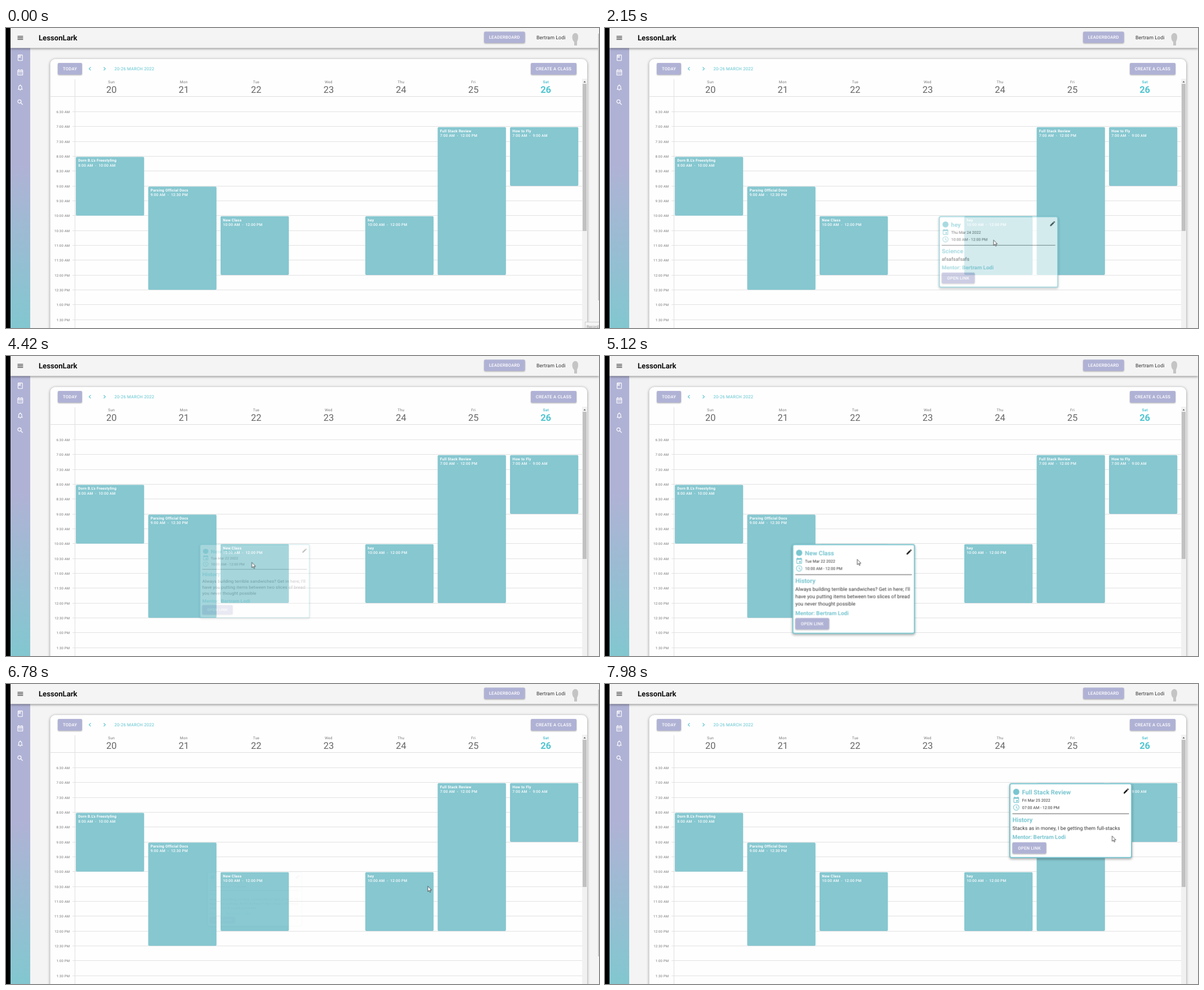
An HTML page that plays this animation: 1053x532 px, repeating every 8000 ms.

```html
<!DOCTYPE html>
<html lang="en">
<head>
<meta charset="utf-8">
<title>Class calendar</title>
<style>
html, body { margin: 0; width: 100%; height: 100%; overflow: hidden; background: #f4f4f4; }
svg { display: block; font-family: Roboto, sans-serif; text-rendering: geometricPrecision; }
.teal { fill: #78c6d0; }
.bold { font-weight: 700; }
.btn rect { fill: #b0b2d5; filter: drop-shadow(0 1px 1px rgba(0,0,0,.3)); }
.btn text { fill: #fff; font-size: 7.67px; font-weight: 500; letter-spacing: .02857em; text-anchor: middle; }
.day { font-size: 6.58px; letter-spacing: .0333em; text-anchor: middle; fill: #777; }
.date { font-size: 16.45px; text-anchor: middle; fill: #666; }
.now { fill: #50c5d1; font-weight: 700; }
.hour { font-size: 6.03px; letter-spacing: .0333em; text-anchor: end; fill: #757575; }
.event rect { fill: #86c7d0; }
.event text { fill: #fff; font-size: 6.58px; font-weight: 500; letter-spacing: .0333em; }
.event .bold { font-weight: 700; }
.frame { fill: #fff; stroke: #7cc6d0; stroke-width: 2; filter: drop-shadow(0 2px 2px rgba(0,0,0,.35)); }
.title { font-size: 10.97px; font-weight: 700; }
.when { font-size: 7.13px; fill: #333; }
.body { font-size: 8.77px; letter-spacing: .00938em; fill: #333; }
.mentor { font-size: 9.87px; font-weight: 700; }

.pop, .grow { animation: 8s cubic-bezier(.4,0,.2,1) infinite; }
.p1 { animation-name: fade1; } .p1 .grow { animation-name: grow1; }
.p2 { animation-name: fade2; } .p2 .grow { animation-name: grow2; }
.p3 { animation-name: fade3; } .p3 .grow { animation-name: grow3; }
@keyframes fade1 { 0%, 25.35%, 48.69%, 100% { opacity: 0 } 29.04%, 45% { opacity: 1 } }
@keyframes grow1 { 0%, 25.35%, 48.69%, 100% { transform: scale(.75,.5625) } 27.8%, 46.23% { transform: scale(1,1) } }
@keyframes fade2 { 0%, 54.25%, 85.68%, 100% { opacity: 0 } 58.11%, 81.81% { opacity: 1 } }
@keyframes grow2 { 0%, 54.25%, 85.68%, 100% { transform: scale(.75,.5625) } 56.83%, 83.1% { transform: scale(1,1) } }
@keyframes fade3 { 0%, 91.06% { opacity: 0 } 94.75%, 100% { opacity: 1 } }
@keyframes grow3 { 0%, 91.06% { transform: scale(.75,.5625) } 93.51%, 100% { transform: scale(1,1) } }

.thumb { animation: lock 8s step-end infinite; }
@keyframes lock {
  0%, 45%, 81.81% { opacity: 1 }
  25.35%, 54.25%, 91.06%, 100% { opacity: 0 }
}
.tip { animation: tip 8s step-end infinite; }
@keyframes tip { 0% { opacity: 1 } .75%, 100% { opacity: 0 } }
.click { animation: click 8s step-end infinite; }
@keyframes click {
  0%, 22.75%, 44.5%, 51.5%, 81.6%, 88.6%, 100% { opacity: 0 }
  21.5%, 43.4%, 50.4%, 80.5%, 87.5% { opacity: .9 }
}
.cursor { animation: move 8s ease-in-out infinite; }
@keyframes move {
  0%, .37% { transform: translate(1040px,534px) }
  5.13%, 16% { transform: translate(445px,248px) }
  19.38%, 29.2% { transform: translate(690px,375.5px) }
  35% { transform: translate(640px,358px) }
  39.4% { transform: translate(529px,296px) }
  42%, 45.6% { transform: translate(536.5px,293.5px) }
  50%, 58.5% { transform: translate(436.5px,365.5px) }
  64.5% { transform: translate(448px,360px) }
  66.5% { transform: translate(358px,386px) }
  70% { transform: translate(446px,410px) }
  72.5% { transform: translate(360px,424px) }
  74.4% { transform: translate(400px,437px) }
  79.4%, 82.3% { transform: translate(662px,468.5px) }
  87.2%, 93.5% { transform: translate(834.5px,249.5px) }
  98.75%, 100% { transform: translate(900.5px,269px) }
}
</style>
</head>
<body>
<svg id="stage" width="1053" height="532" viewBox="0 0 1053 532"></svg>
<script>
const MENTOR = 'Bertram Lodi';
const COL = 128.57, ROW = 26.33, FIRST = 148.4;
const range = n => [...Array(n).keys()];

const icons = {
  menu: '<path d="M3 6h18v2H3zM3 11h18v2H3zM3 16h18v2H3z"/>',
  left: '<path d="M15.4 7.4L14 6l-6 6 6 6 1.4-1.4L10.8 12z"/>',
  right: '<path d="M10 6L8.6 7.4l4.6 4.6-4.6 4.6L10 18l6-6z"/>',
  book: '<path fill-rule="evenodd" d="M6 2h12a2 2 0 0 1 2 2v16a2 2 0 0 1-2 2H6a2 2 0 0 1-2-2V4a2 2 0 0 1 2-2zM9 4h2v5l-1-.75L9 9zM18 20H6V4h1v9l3-2.25L13 13V4h5z"/>',
  month: '<path fill-rule="evenodd" d="M6 1h2v2h8V1h2v2h1a2 2 0 0 1 2 2v14a2 2 0 0 1-2 2H5a2 2 0 0 1-2-2V5a2 2 0 0 1 2-2h1zM5 9v10h14V9zM5 5v2h14V5z"/><path d="M7 11h2v2H7zM11 11h2v2h-2zM15 11h2v2h-2zM7 15h2v2H7zM11 15h2v2h-2zM15 15h2v2h-2z"/>',
  bell: '<path fill-rule="evenodd" d="M10 20h4a2 2 0 0 1-4 0zM18 16v-5c0-3.1-1.6-5.6-4.5-6.3V4a1.5 1.5 0 0 0-3 0v.7C7.6 5.4 6 7.9 6 11v5l-2 2v1h16v-1zM16 17H8v-6c0-2.5 1.5-4.5 4-4.5s4 2 4 4.5z"/>',
  search: '<path d="M14.2 14.2l5.6 5.6M15 9.5a5.5 5.5 0 1 1-11 0a5.5 5.5 0 0 1 11 0z" fill="none" stroke="#fff" stroke-width="2.1"/>',
  event: '<path fill-rule="evenodd" d="M6 1h2v2h8V1h2v2h1a2 2 0 0 1 2 2v14a2 2 0 0 1-2 2H5a2 2 0 0 1-2-2V5a2 2 0 0 1 2-2h1zM5 8v11h14V8z"/><path d="M12 12h5v5h-5z"/>',
  clock: '<path d="M12 7v5.5l4.5 2.7M21 12a9 9 0 1 1-18 0a9 9 0 0 1 18 0z" fill="none" stroke="#78c6d0" stroke-width="1.9"/>',
  edit: '<path d="M3 17.25V21h3.75L17.8 9.95 14.05 6.2zM20.7 7a1 1 0 0 0 0-1.4l-2.3-2.3a1 1 0 0 0-1.4 0l-1.9 1.8 3.75 3.75z"/>'
};

const icon = (name, x, y, fill, size = 13.16) =>
  `<g transform="translate(${x - size / 2} ${y - size / 2}) scale(${size / 24})" fill="${fill}">${icons[name]}</g>`;
const text = (x, y, cls, s, attr = '') => `<text x="${x}" y="${y}" class="${cls}" ${attr}>${s}</text>`;
const rect = (x, y, w, h, attr) => `<rect x="${x}" y="${y}" width="${w}" height="${h}" ${attr}/>`;
const button = (x, y, w, h, label) =>
  `<g class="btn">${rect(x, y, w, h, 'rx="2"')}${text(x + w / 2, y + h / 2 + 2.6, '', label)}</g>`;

function shell() {
  return rect(0, 0, 1053, 532, 'fill="#f4f4f4"') +
    rect(8, 30, 35, 502, 'fill="url(#side)"') +
    ['book', 'month', 'bell', 'search'].map((n, i) => icon(n, 25.3, 52.8 + i * 26.3, '#fff')).join('') +
    rect(8, 0, 1045, 35.5, 'fill="#f4f4f4" style="filter:drop-shadow(0 1px 2px rgba(0,0,0,.5))"') +
    rect(0, 0, 8, 532, 'fill="#000"') +
    icon('menu', 25.4, 17.5, '#111') +
    text(58, 22, 'bold', 'LessonLark', 'font-size="13.16" fill="#111"') +
    button(849, 6.5, 72.5, 20, 'LEADERBOARD') +
    text(942, 20.4, 'body', MENTOR) +
    '<path d="M1011 9c4 0 5.300 4 5 8s-1.600 6-2 7v7h-5v-6c-2-2-3.500-5-3.500-8.500s1.500-7.500 5.500-7.500z" fill="#c4c4c4"/>';
}

function calendar() {
  const days = ['Sun', 'Mon', 'Tue', 'Wed', 'Thu', 'Fri', 'Sat'];
  const head = days.map((d, i) => {
    const x = 187.2 + i * COL, now = i == 6 ? ' now' : '';
    return text(x, 98.4, 'day' + now, d) + text(x, 115, 'date' + now, 20 + i);
  }).join('');
  const rows = range(15).map(i => {
    const y = Math.floor(FIRST + i * ROW) + .5, m = 390 + i * 30, h = Math.floor(m / 60);
    const label = `${(h + 11) % 12 + 1}:${m % 60 ? '30' : '00'} ${h < 12 ? 'AM' : 'PM'}`;
    return `<path d="M118 ${y}H1023" stroke="#e2e2e2"/>` + text(113.3, y + 2, 'hour', label);
  }).join('');
  return rect(78.5, 55, 953.5, 500, 'rx="9" fill="#fefefe" style="filter:drop-shadow(0 1px 2.5px rgba(0,0,0,.42))"') +
    button(92, 62, 43, 20.8, 'TODAY') +
    icon('left', 149, 72.3, '#50c0cc') + icon('right', 175, 72.3, '#50c0cc') +
    text(192.5, 75, '', '20-26 MARCH 2022', 'font-size="7.67" letter-spacing=".22" fill="#5bc3cf"') +
    button(932, 62, 81, 20.8, 'CREATE A CLASS') +
    head + rows +
    '<path d="M79 121.500H1023M122.500 91V532" stroke="#dfdfdf" fill="none"/>' +
    rect(1023, 90, 9, 442, 'fill="#f1f1f1"') + rect(1024, 99, 7, 261, 'fill="#c1c1c1"') +
    '<path d="M1025.500 96.500h4l-2-2.500z" fill="#555"/>';
}

function event(day, from, to, title, span) {
  const x = 124 + day * 128.5, y = FIRST + (from - 6.5) * 2 * ROW + 1.1;
  return `<g class="event">${rect(x, y, 121.3, (to - from) * 2 * ROW - 1.1, 'rx="2"')}` +
    text(x + 4.3, y + 8.7, 'bold', title) +
    text(x + 4.3, y + 17.3, '', span.replace('-', '\u00a0 - \u00a0')) + '</g>';
}

// Drawn around its top centre, the point it grows from.
function popup(n, x, y, title, date, span, subject, lines) {
  const extra = (lines.length - 1) * 13.16, l = -103.5;
  return `<g transform="translate(${x} ${y})"><g class="pop p${n}"><g class="grow">` +
    rect(-108, 1, 216, 131 + extra, 'rx="3" class="frame"') +
    `<circle cx="${l + 6.8}" cy="15.5" r="5.5" class="teal"/>` +
    text(l + 17, 19.6, 'title teal', title) +
    icon('edit', 98.5, 14, '#111', 12) +
    icon('event', l + 6.8, 30, '#78c6d0') + text(l + 17.3, 32.8, 'when', date) +
    icon('clock', l + 6.8, 43.2, '#78c6d0') + text(l + 17.3, 45.5, 'when', span) +
    `<path d="M${l} 54.200H103.500" stroke="#555" stroke-width="1.1"/>` +
    text(l, 69, 'title teal', subject) +
    lines.map((s, i) => text(l, 82.8 + i * 13.16, 'body', s)).join('') +
    text(l, 99.3 + extra, 'mentor teal', 'Mentor: ' + MENTOR) +
    button(l, 105 + extra, 60, 20, 'OPEN LINK') + '</g></g></g>';
}

document.getElementById('stage').innerHTML =
  `<defs><linearGradient id="side" x2="0" y2="1">
    <stop offset=".42" stop-color="#b0b2d5"/><stop offset="1" stop-color="#82c7d0"/>
  </linearGradient></defs>` +
  shell() + calendar() +
  event(0, 8, 10, "Dorn B.L's Freestyling", '8:00 AM-10:00 AM') +
  event(1, 9, 12.5, 'Parsing Official Docs', '9:00 AM-12:30 PM') +
  event(2, 10, 12, 'New Class', '10:00 AM-12:00 PM') +
  event(4, 10, 12, 'hey', '10:00 AM-12:00 PM') +
  event(5, 7, 12, 'Full Stack Review', '7:00 AM-12:00 PM') +
  event(6, 7, 9, 'How to Fly', '7:00 AM-9:00 AM') +
  rect(1051.5, 10, 1.5, 473, 'class="thumb" fill="#c1c1c1"') +
  `<g class="tip">${rect(1028.5, 521.5, 30, 15, 'fill="#f4f4f4" stroke="#cfcfcf"')}` +
  text(1031, 531.6, '', 'Record', 'font-size="6.8" fill="#8a8a8a"') + '</g>' +
  popup(1, 698.8, 333.5, 'hey', 'Thu Mar 24 2022', '10:00 AM - 12:00 PM', 'Science', ['afsafsafsafs']) +
  popup(2, 441.5, 333.5, 'New Class', 'Tue Mar 22 2022', '10:00 AM - 12:00 PM', 'History',
    ["Always building terrible sandwiches? Get in here; I'll",
     'have you putting items between two slices of bread', 'you never thought possible']) +
  popup(3, 827, 175.7, 'Full Stack Review', 'Fri Mar 25 2022', '07:00 AM - 12:00 PM', 'History',
    ['Stacks as in money, I be getting them full-stacks']) +
  `<g class="cursor"><circle class="click" cx="0" cy=".5" r="6.6" fill="#fbec3c"/>
    <path d="M0 .5V10L2.200 8 3.700 11.300 5.200 10.600 3.700 7.400H6.700Z" fill="#fff" stroke="#333" stroke-width=".8"/></g>`;
</script>
</body>
</html>
```
